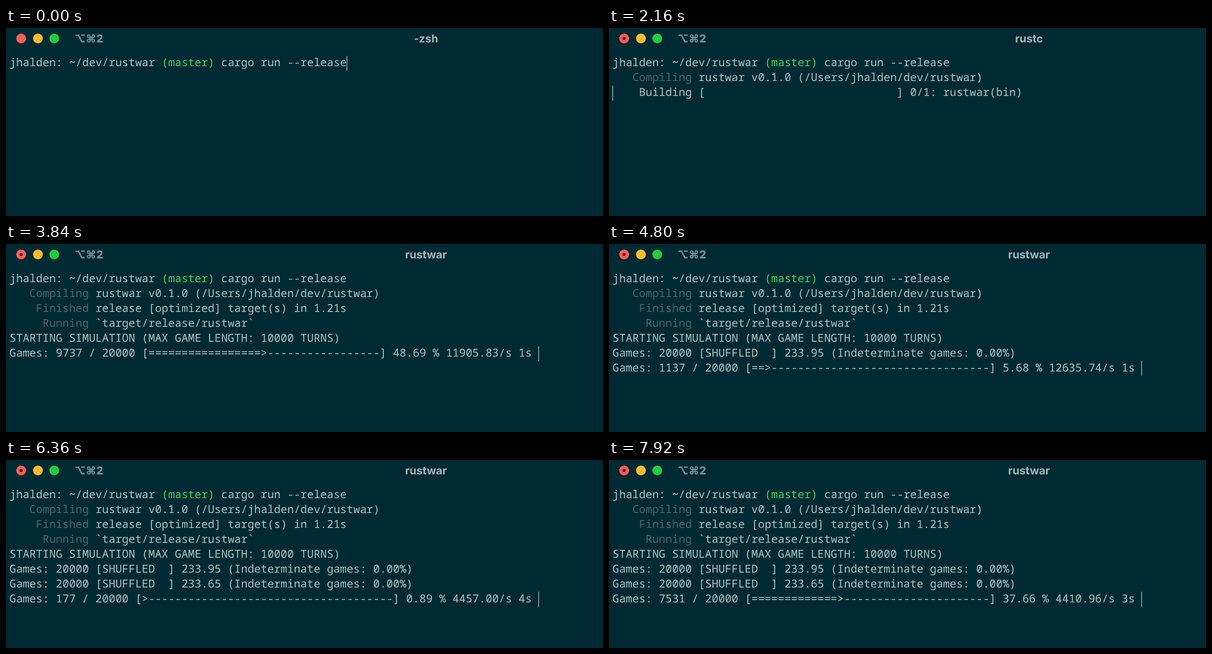
Write an HTML page that moves like this. It is 1280 by 404 pixels and loops after 8 s.

```html
<!DOCTYPE html>
<html lang="en">
<head>
<meta charset="utf-8">
<title>Terminal</title>
<style>
  html, body { margin: 0; width: 100%; height: 100%; overflow: hidden; background: #002a33; }
  body { position: relative; text-rendering: geometricPrecision; }
  .light { position: absolute; top: 11.5px; width: 21px; height: 21px; border-radius: 50%; }
  #busy { position: absolute; left: 7px; top: 7px; width: 7px; height: 7px; border-radius: 50%; background: #6b0d0a; }
  .bar { position: absolute; top: 7px; font: 700 23.5px/32px Inter, sans-serif; white-space: pre; }
  #tab { left: 147px; color: #768d92; font-weight: 800; }
  #title { left: 700.5px; width: 400px; text-align: center; color: #a1b3b6; }
  #screen { position: absolute; left: 7.6px; top: 58.4px; margin: 0; color: #acc1c5;
    font: 23.64px/31.9px "Noto Sans Mono", monospace; font-variant-ligatures: none; }
  .branch { color: #3bd75f; }
  .dim { color: #4a666d; }
  #cursor { position: absolute; width: 2px; height: 32px; background: #81979b; }
</style>
</head>
<body>
<div class="light" style="left:22px;background:#ff5f57"><div id="busy"></div></div>
<div class="light" style="left:57.5px;background:#febc2e"></div>
<div class="light" style="left:93px;background:#28c840"></div>
<div class="bar" id="tab">⌥⌘2</div>
<div class="bar" id="title"></div>
<pre id="screen"></pre>
<div id="cursor"></div>
<script>
const LOOP = 8000, STEP = 120, TOTAL = 20000, COLS = 80, PITCH = 14.18, ROW = 31.9;
const $ = id => document.getElementById(id);
const dim = word => `<span class="dim">${word.padStart(12)}</span> `;

const prompt = 'jhalden: ~/dev/rustwar <span class="branch">(master)</span> cargo run --release';
const compiling = dim('Compiling') + 'rustwar v0.1.0 (/Users/jhalden/dev/rustwar)';
const building = 'Building'.padStart(12) + ` [${' '.repeat(29)}] 0/1: rustwar(bin)`;
const built = [
  dim('Finished') + 'release [optimized] target(s) in 1.21s',
  dim('Running') + '`target/release/rustwar`'
];
const heading = 'STARTING SIMULATION (MAX GAME LENGTH: 10000 TURNS)';

// Each batch passes through `count` games and `speed` at time `at`;
// `pace` is games per ms, `drift` the change of speed per ms.
const batches = [
  { from: 3120, at: 3840, count: 9737, pace: 11.98, speed: 11905.83, drift: 0.05, turns: '233.95' },
  { from: 4800, at: 4800, count: 1137, pace: 12.9, speed: 12635.74, drift: -0.05, turns: '233.65' },
  { from: 6360, at: 6360, count: 177, pace: 7354 / 1560, speed: 4457, drift: -46.04 / 1560 }
];

function progress(b, t) {
  const n = Math.round(b.count + b.pace * (t - b.at));
  const speed = b.speed + b.drift * (t - b.at);
  const left = Math.round((TOTAL - n) / speed);
  const head = `Games: ${n} / ${TOTAL} [`;
  const tail = `] ${(n / (TOTAL / 100)).toFixed(2)} % ${speed.toFixed(2)}/s ${left}s `;
  const size = COLS - head.length - tail.length;
  const done = Math.ceil(n / TOTAL * size);
  return head + '='.repeat(done - 1) + '&gt;' + '-'.repeat(size - done) + tail;
}

const summary = b => `Games: ${TOTAL} [SHUFFLED  ] ${b.turns} (Indeterminate games: 0.00%)`;

function draw(now) {
  const t = Math.floor(now % LOOP / STEP) * STEP;
  const lines = [prompt];
  let col = 0;
  if (t >= 1800) lines.push(compiling);
  if (t >= 3000) lines.push(...built);
  let row = lines.length;
  if (t < 1680) { row = 0; col = 51; }
  if (t >= 1920 && t < 3000) lines.push(building);

  const running = batches.filter(b => t >= b.from);
  if (running.length) {
    const current = running.pop();
    lines.push(heading, ...running.map(summary), progress(current, t));
    row = lines.length - 1;
    col = COLS;
  }

  $('screen').innerHTML = lines.join('\n');
  $('title').textContent = t < 2160 ? '-zsh' : t < 3120 ? 'rustc' : 'rustwar';
  $('busy').hidden = t < 2160;
  $('cursor').style.left = Math.round(7 + col * PITCH) + 'px';
  $('cursor').style.top = Math.round(60 + row * ROW) + 'px';
}

function tick() {
  draw(performance.now());
  requestAnimationFrame(tick);
}
tick();
</script>
</body>
</html>
```
